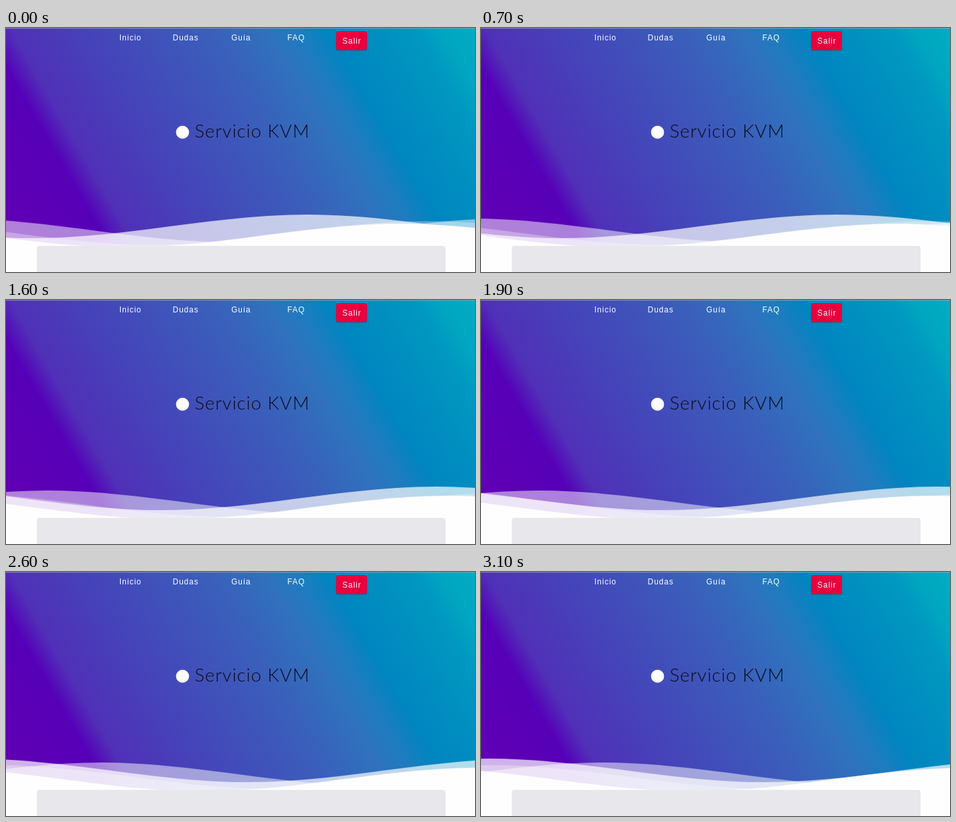
These frames come from a looping animation (716 px wide and 374 px high, 3.2 s). An HTML page:

```html
<!DOCTYPE html>
<html lang="es">
<head>
<meta charset="utf-8">
<title>Servicio KVM</title>
<style>
  html, body { margin: 0; width: 100%; height: 100%; overflow: hidden; background: #fefefe; }
  .stage { position: relative; width: 716px; height: 374px; overflow: hidden; }
  .stage > * { position: absolute; }
  .hero {
    left: 0; top: 0; width: 716px; height: 338px;
    background: linear-gradient(60deg,
      #6200b3 0%, #5a00b6 12%, #5500b8 17.5%, #5030b8 22%, #4642b9 34%, #3a5fbb 55%,
      #2f72bd 65%, #1e7cbf 70%, #0085c0 75%, #0098c0 90%, #00a6c0 94%, #00acc1 100%);
  }
  .edge { left: 0; top: 0; width: 716px; height: 1px; background: rgba(165, 175, 200, .65); }
  .waves { left: 0; top: 282px; width: 716px; height: 56.1px; }
  .panel { left: 47px; top: 334px; width: 624px; height: 60px; border-radius: 4px; background: #e8e7ec; }
  .exit {
    left: 504px; top: 5px; width: 47px; height: 29px; border-radius: 3px;
    background: #e8003d; box-shadow: 0 1px 2px rgba(0, 0, 0, .25);
  }
  .labels { left: 0; top: 0; }
  .nav { font: 12px "Liberation Sans", Arial, sans-serif; letter-spacing: 1px; fill: #fff; }
  .title { font: 300 28px Lato, sans-serif; letter-spacing: 1px; fill: #0b0b1c; }
</style>
</head>
<body>
<div class="stage">
  <div class="hero"></div>
  <div class="edge"></div>
  <svg class="waves" viewBox="0 24 150 28" preserveAspectRatio="none">
    <defs>
      <path id="wave" d="M-160 44c30 0 58-18 88-18s58 18 88 18 58-18 88-18 58 18 88 18v44h-352z"/>
    </defs>
    <use href="#wave" x="48" y="0" fill="rgba(255,255,255,.7)"/>
    <use href="#wave" x="48" y="3" fill="rgba(255,255,255,.5)"/>
    <use href="#wave" x="48" y="5" fill="rgba(255,255,255,.3)"/>
    <use href="#wave" x="48" y="7" fill="#fefefe"/>
  </svg>
  <div class="panel"></div>
  <div class="exit"></div>
  <svg class="labels" width="716" height="374">
    <g class="nav">
      <text x="173" y="19">Inicio</text>
      <text x="254.5" y="19">Dudas</text>
      <text x="344" y="19">Guía</text>
      <text x="429.5" y="19">FAQ</text>
      <text x="513.5" y="24">Salir</text>
    </g>
    <circle cx="269.5" cy="159.8" r="10" fill="#fff"/>
    <text class="title" x="288" y="168">Servicio KVM</text>
  </svg>
</div>
<script>
  const LOOP = 3200, STEP = 100;
  // Period of each wave and its position in that period when the loop starts, in ms.
  const timing = [[7000, 1470], [10000, 5530], [13000, 5480], [20000, 7550]];

  const waves = [...document.querySelectorAll('.waves > use')].map((el, i) => {
    const [duration, start] = timing[i];
    const drift = el.animate(
      [{ transform: 'translateX(-90px)' }, { transform: 'translateX(85px)' }],
      { duration, easing: 'cubic-bezier(.55,.5,.45,.5)', iterations: Infinity }
    );
    drift.pause();
    return { drift, start };
  });

  const origin = performance.now();

  function render() {
    const elapsed = Math.max(0, performance.now() - origin) % LOOP;
    const time = Math.floor(elapsed / STEP) * STEP;
    for (const { drift, start } of waves) drift.currentTime = start + time;
    requestAnimationFrame(render);
  }
  render();
</script>
</body>
</html>
```
